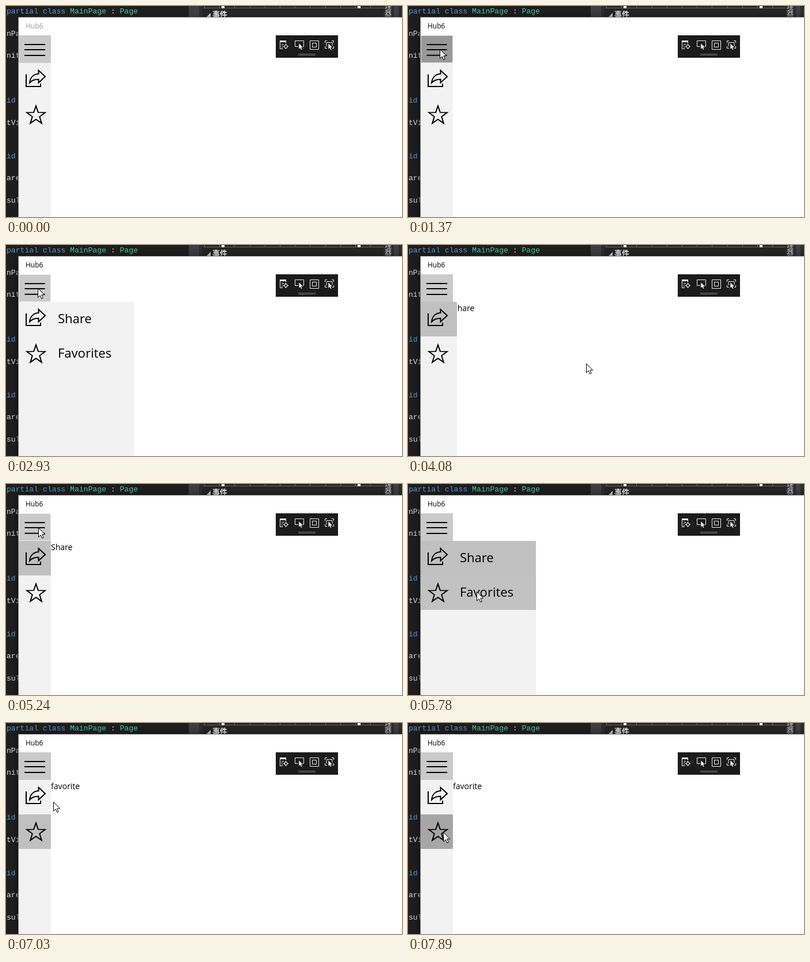
Write an HTML page with a canvas that moves like this. It is 687 by 367 pixels and loops after 8000 ms.

```html
<!DOCTYPE html>
<html>
<head>
<meta charset="utf-8">
<style>
html, body { margin: 0; width: 687px; height: 367px; overflow: hidden; background: #fff; }
canvas { display: block; }
</style>
</head>
<body>
<canvas id="stage" width="687" height="367"></canvas>
<script>
const g = document.getElementById('stage').getContext('2d');
const LOOP = 8000, LEFT = 22, ITEMS_TOP = 99, ITEM = 60;
const CLOSED = 56, OPEN = 200, SLIDE = 240, PRESS = 150;
const SANS = '"Open Sans", sans-serif';
const MONO = '13.1px "Liberation Mono", monospace';
const CJK = '"Noto Sans CJK SC", "Noto Sans CJK", sans-serif';

// Every click toggles the pane; the last two also choose an item
const menuClicks = [1520, 2080, 2600, 5400];
const SHARE = 3930, FAVORITE = 6010;
const toggles = [...menuClicks, SHARE, FAVORITE].sort((a, b) => a - b);

// Mouse glides: start, end, and where it comes to rest
const glides = [
  [660, 1140, 55, 75], [2930, 3310, 86, 135], [3850, 4070, 309, 206],
  [4310, 4460, 295, 201], [4630, 5200, 56, 76], [5470, 5780, 119, 187],
  [6570, 6800, 395, 150], [6800, 7030, 82, 137], [7430, 7890, 61, 190]
];

const progress = (t, a, b) => Math.min(1, Math.max(0, (t - a) / (b - a)));

function paneWidth(t) {
  let w = CLOSED;
  toggles.forEach((start, i) => {
    const u = progress(t, start, start + SLIDE);
    w += ((i % 2 ? CLOSED : OPEN) - w) * (1 - (1 - u) ** 3);
  });
  return Math.round(w);
}

function mouseAt(t) {
  if (t < glides[0][0]) return null;
  let x = 85, y = 8;
  for (const [a, b, toX, toY] of glides) {
    const u = progress(t, a, b);
    x += (toX - x) * u;
    y += (toY - y) * u;
  }
  return [Math.round(x), Math.round(y)];
}

function box(x, y, w, h, color) {
  g.fillStyle = color;
  g.fillRect(x, y, w, h);
}

function text(s, x, y, font, color) {
  g.font = font;
  g.fillStyle = color;
  g.fillText(s, x, y);
}

function line(d, width, color) {
  g.lineWidth = width;
  g.strokeStyle = color;
  g.stroke(new Path2D(d));
}

function pointer(x, y, size, fill, edge) {
  const shape = new Path2D('M.5 .5V16.3L4.2 12.8L6.7 18.4L9.1 17.3L6.7 11.8H11.6Z');
  g.save();
  g.translate(x, y);
  g.scale(size, size);
  g.fillStyle = fill;
  g.fill(shape);
  if (edge) {
    g.strokeStyle = edge;
    g.lineWidth = 1;
    g.stroke(shape);
  }
  g.restore();
}

// Source text on a character grid
function code(s, col, row, color = '#dcdcdc') {
  text(s, 1 + col * 7.86, 13 + row * 19.35, MONO, color);
}

function editor() {
  box(0, 0, 687, 367, '#1e1e1e');
  const blue = '#569cd6', teal = '#4ec9b0';
  code('partial class', 0, 0, blue);
  code('MainPage', 14, 0, teal);
  code(':', 23, 0);
  code('Page', 25, 0, teal);
  code('nPa', 0, 2);
  code('nit', 0, 4);
  code('oid', -1, 8, blue);
  code('tVi', 0, 10);
  code('oid', -1, 13, blue);
  code('are', 0, 15);
  code('sul', 0, 17);

  box(317, 0, 18, 20, '#3e3e42');
  box(335, 0, 352, 20, '#2d2d30');
  box(341, 0, 314, 20, '#252526');
  box(342, 3, 313, 1, '#6a6a6e');
  for (let x = 344; x < 655; x += 26.2) box(Math.round(x), 0, 1, 4, '#6a6a6e');
  box(374, 0, 5, 4, '#fff');
  box(610, 0, 5, 4, '#fff');
  g.fillStyle = '#d0d0d0';
  g.fill(new Path2D('M348 19L355 12V19Z'));
  text('事件', 358, 19, 'bold 13px ' + CJK, '#f1f1f1');
  text('理', 657, 5, '12px ' + CJK, '#d0d0d0');
  text('器', 657, 17, '12px ' + CJK, '#d0d0d0');
  box(673, 0, 8, 20, '#3e3e46');
}

function toolbar() {
  box(468, 51, 108, 39, '#1b1b1c');
  const white = '#f1f1f1';
  box(475, 60, 11, 3, white);
  line('M475.5 62V74.5H480M485.5 62V65M478 66.5H482M478 69.5H480M478 72.5H480', 1, white);
  line('M488.5 70.5A3 3 0 1 1 482.5 70.5A3 3 0 1 1 488.5 70.5M485.5 66V69M485.5 72V75M481 70.5H484M487 70.5H490', 1, white);
  line('M507 70.5H501.5V60.5H516.5V70.5H515', 1, white);
  pointer(508, 65, .6, white);
  line('M527.5 60.5H542.5V75.5H527.5ZM531.5 64.5H538.5V71.5H531.5Z', 1, white);
  line('M553.5 64V60.5H557M565 60.5H568.5V64M568.5 70V73.5H566M557 73.5H553.5V70M556 70.5V63.5H566V69', 1, white);
  pointer(559, 65, .6, white);
  line('M507 83.5H537M507 85.5H537', 1, '#6b6b6b');
}

function menuButton(t, mouse) {
  const over = mouse && mouse[0] < LEFT + CLOSED && mouse[1] >= 51 && mouse[1] < ITEMS_TOP;
  const pressed = menuClicks.some(c => t >= c - PRESS && t < c);
  g.save();
  if (over) {
    g.translate(50, 75);
    g.scale(.975, .975);
    g.translate(-50, -75);
  }
  box(LEFT, 51, CLOSED, 48, pressed ? '#999' : '#cacaca');
  for (let i = 0; i < 3; i++) box(32, 66 + 9.5 * i | 0, 36, 2, '#000');
  g.restore();
}

function star(cx, cy, r) {
  let d = '';
  for (let i = 0; i < 10; i++) {
    const a = i * Math.PI / 5, q = i % 2 ? r * .4 : r;
    d += (i ? 'L' : 'M') + (cx + q * Math.sin(a)) + ' ' + (cy - q * Math.cos(a));
  }
  line(d + 'Z', 2, '#000');
}

function pane(t, mouse) {
  const w = paneWidth(t);
  const selected = t >= FAVORITE ? 1 : t >= SHARE ? 0 : -1;
  g.save();
  g.beginPath();
  g.rect(LEFT, ITEMS_TOP, w, 268);
  g.clip();
  box(LEFT, ITEMS_TOP, w, 268, '#f2f2f2');
  ['Share', 'Favorites'].forEach((name, i) => {
    const top = ITEMS_TOP + ITEM * i;
    const over = mouse && mouse[0] < LEFT + w && mouse[1] >= top && mouse[1] < top + ITEM;
    if (i === selected) box(LEFT, top, w, ITEM, over ? '#a6a6a6' : '#c0c0c0');
    else if (over) box(LEFT, top, w, ITEM, '#c2c2c2');
    text(name, 90, top + 37, '22px ' + SANS, '#000');
  });
  line('M35 119V140H60V135', 2, '#000');
  line('M41 133.5C42 124 48 118.5 56.5 118V112L68 122.8L56.5 133.5V127.5C50 127.5 45 129 41 133.5Z', 2, '#000');
  star(52, 190.5, 16.6);
  g.restore();
}

function draw(now) {
  const t = now % LOOP, active = t >= menuClicks[0] - PRESS, mouse = mouseAt(t);
  editor();
  g.save();
  g.shadowColor = active ? 'rgba(0,0,0,.5)' : 'rgba(0,0,0,.25)';
  g.shadowBlur = active ? 12 : 6;
  box(LEFT - 1, 19, 700, 400, '#777');
  g.restore();
  box(LEFT, 20, 700, 400, '#fff');
  text('Hub6', 34, 39, '12px ' + SANS, active ? '#000' : '#999');
  if (t >= SHARE) text(t < FAVORITE ? 'Share' : 'favorite', 78, 115, '14px ' + SANS, '#000');
  pane(t, mouse);
  menuButton(t, mouse);
  toolbar();
  if (mouse) pointer(...mouse, 1, '#fff', '#000');
  requestAnimationFrame(draw);
}
requestAnimationFrame(draw);
</script>
</body>
</html>
```
